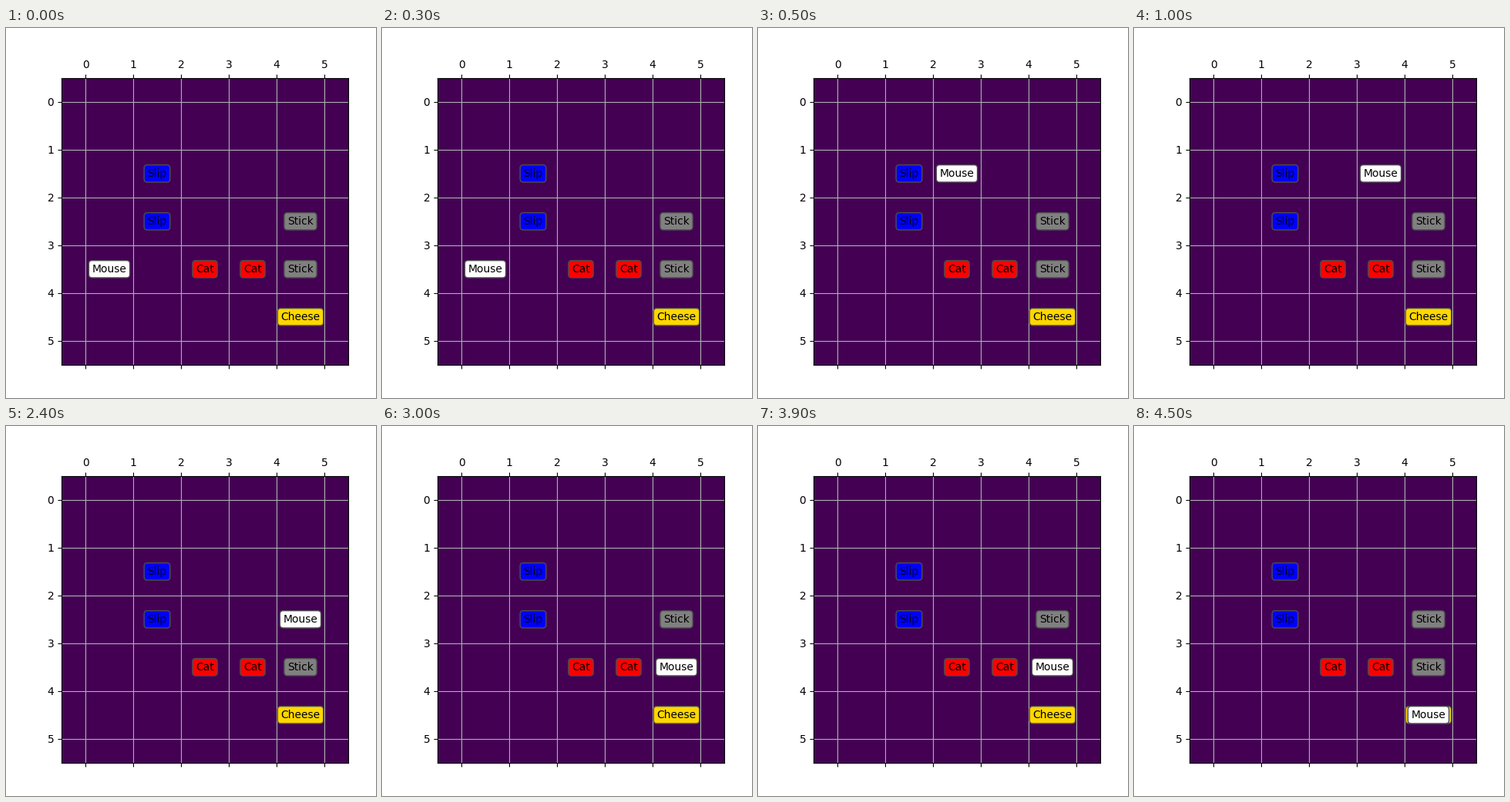
Animation, 480 px wide and 480 px high, one loop 5 s. Source, as a matplotlib script:

```python
import matplotlib.pyplot as plt
import numpy as np
from matplotlib.animation import FuncAnimation

STEP_MS = 500
ITEMS = [
    ("Slip", "blue", [(1, 1), (1, 2)]),
    ("Cat", "red", [(2, 3), (3, 3)]),
    ("Stick", "gray", [(4, 2), (4, 3)]),
    ("Cheese", "gold", [(4, 4)]),
]
# Cells the mouse visits and how many steps it stays in each.
PATH = [(0, 3), (2, 1), (3, 1), (4, 2), (4, 3), (4, 4)]
STAYS = [1, 1, 1, 3, 3, 1]
TRACK = np.repeat(PATH, STAYS, axis=0) + 0.5

plt.rcParams["font.family"] = "DejaVu Sans"
fig = plt.figure(figsize=(4.8, 4.8), dpi=100)
ax = fig.add_axes((0.15, 0.09, 0.775, 0.775))
ax.matshow(np.zeros((6, 6)), cmap="viridis")
ax.grid(True)


def label(name, color, x, y):
    return ax.text(x, y, name, ha="center", va="center", fontsize=10,
                   bbox=dict(boxstyle="round", facecolor=color, edgecolor="0.3"))


for name, color, cells in ITEMS:
    for col, row in cells:
        label(name, color, col + 0.5, row + 0.5)

mouse = label("Mouse", "white", *TRACK[0])


def update(i):
    mouse.set_position(TRACK[i])
    return [mouse]


anim = FuncAnimation(fig, update, frames=len(TRACK), interval=STEP_MS,
                     repeat=True, repeat_delay=0)
plt.show()
```
